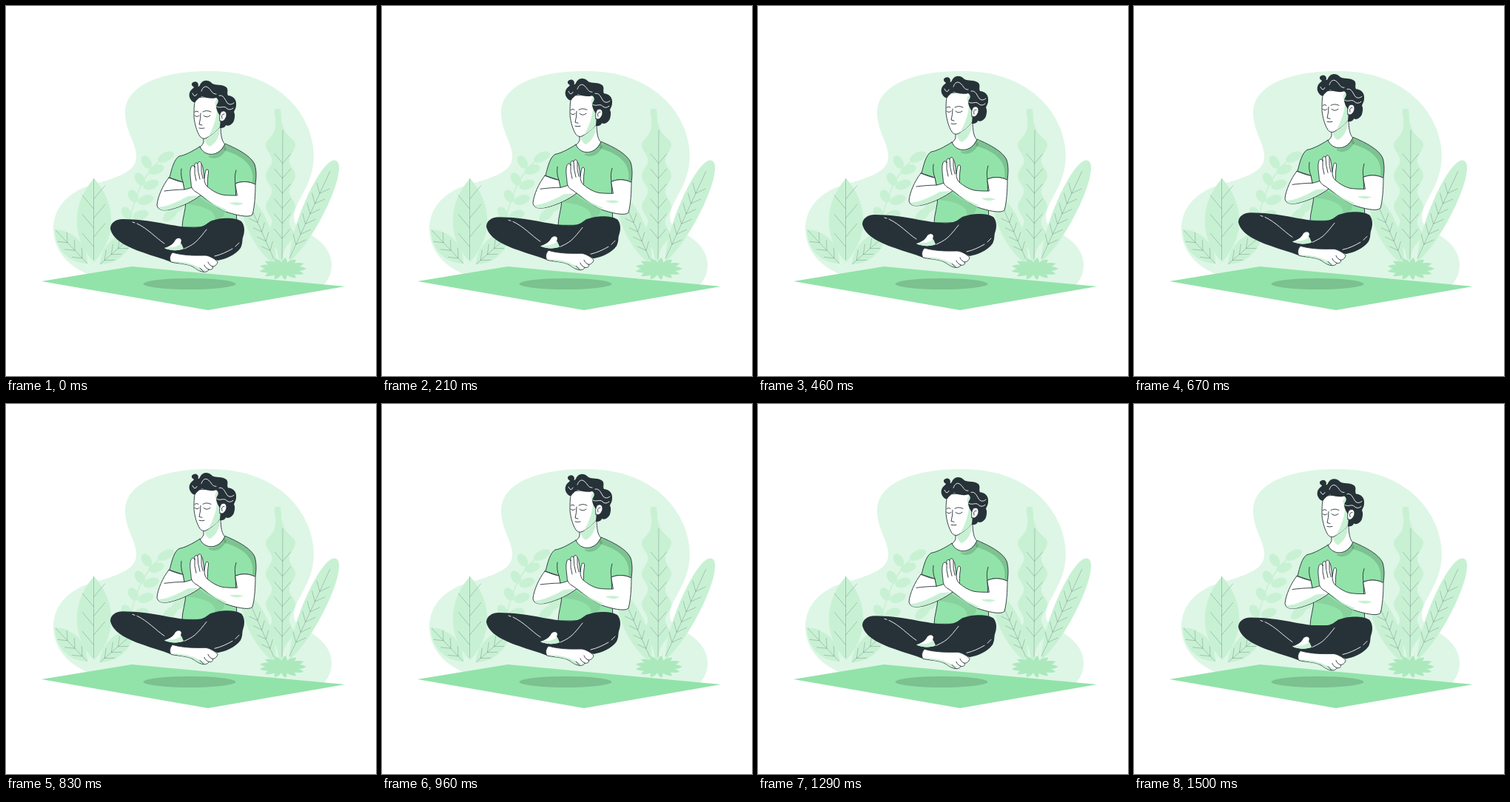
An HTML page for the animation above (1.54 s loop, 500 by 500 pixels).

```html
<!DOCTYPE html>
<html lang="en">
<head>
<meta charset="utf-8">
<title>Floating meditation</title>
<style>
html, body { margin: 0; width: 100%; height: 100%; overflow: hidden; background: #fff; }
svg { display: block; width: 100vw; height: 100vh; }
.leaf { fill: #c8f1d4; }
.vein { fill: none; stroke: #263238; stroke-opacity: .27; stroke-width: .9; }
.skin, .shirt, .line { stroke: #263238; stroke-width: .9; stroke-linecap: round; stroke-linejoin: round; }
.skin, .white { fill: #fff; }
.shirt { fill: #92e3a9; }
.line, .shine { fill: none; }
.shine { stroke: #fff; stroke-width: .9; stroke-linecap: round; }
.tint { fill: #c8f1d4; }
.dark { fill: #263238; }
.shade { opacity: .14; }
.soft { opacity: .07; }
</style>
</head>
<body>
<svg viewBox="0 0 500 500">
  <path fill="#def6e6" d="M120 366C84 354 63 330 64 298C66 266 92 248 118 241C150 232 176 224 176 204C177 186 160 168 161 142C163 105 215 87 278 88C364 88 415 143 416 203C415 245 390 262 389 285C389 300 405 305 415 311C432 322 441 337 440 352C439 365 434 373 428 378L170 356Z"/>
  <path id="leaves" class="leaf"/>
  <g id="sprig" class="leaf"></g>
  <path id="veins" class="vein"/>
  <path id="tuft" fill="#abe9bc"/>

  <path fill="#92e3a9" d="M48 372L170 352L458 379L273 411Z"/>
  <ellipse fill="#7cc190" cx="248" cy="375.5" rx="62.5" ry="7.5"/>

  <g id="man">
    <!-- torso -->
    <path class="skin" d="M267 174V184C266 187 264 189 262 191C267 205 286 206 296 187C292 183 290 176 290 161Z"/>
    <path class="tint" d="M268 179C275 178 282 173 289 165C289 175 284 186 275 190Q270 187 268 179Z"/>
    <path class="shirt" d="M262 190C251 197 241 202 234 203C227 207 224 220 221 232L239 238C240 246 243 255 243 263C243 276 238 288 238 299H312L310 240C319 236 329 237 337 241C338 233 339 224 336 214C331 203 315 194 296 186C289 204 268 205 262 190Z"/>
    <path class="shade" d="M296 187C315 194 331 203 336 214C339 224 338 233 337 240L333 238C336 221 327 204 294 195Z"/>
    <path class="shade" d="M274 204C284 209 293 203 298 193L295 188C290 198 282 203 274 202Z"/>
    <path class="soft" d="M258 256C268 263 280 271 294 276C298 283 291 288 282 290C286 277 266 270 245 268Z"/>
    <path class="line" d="M237 220C236 226 237 233 239 238M311 222C309 228 309 234 310 240"/>

    <!-- legs -->
    <path class="dark" d="M158 288C147 288 141 294 141 301C144 315 161 325 185 333C198 338 211 341 223 346L226 334C240 338 262 336 274 339L286 344C296 342 310 337 317 327C320 321 319 317 320 313C323 305 323 297 318 291C309 285 288 286 276 291C270 295 268 298 258 299C233 301 200 288 158 288Z"/>
    <path class="shine" d="M171 292L174 293M177 294C192 301 202 313 214 321M271 302C266 308 262 314 255 320C250 324 245 326 241 328M282 338C291 336 299 332 306 328M310 325L315 320"/>
    <path class="white" d="M214 327C221 325 227 321 229 316C232 313 236 313 237 317C235 322 237 325 240 328C234 331 221 331 214 327Z"/>
    <path class="tint" d="M214 327C223 325 228 328 237 321L240 328C234 331 221 331 214 327Z"/>
    <path class="skin" d="M225 333C242 338 260 337 270 337C276 338 283 342 286 346C285 350 282 352 279 352C281 355 277 357 274 356C273 359 269 360 265 359C260 358 257 355 252 352C244 348 231 348 223 346C220 341 222 336 225 333Z"/>
    <path class="tint" d="M224 345C235 345 248 347 256 351Q262 354 270 357C267 360 260 358 253 352C244 348 232 348 224 345Z"/>
    <path class="line" d="M279 352Q274 350 273 346M274 356Q269 354 268 350M267 359L262 354"/>

    <!-- arms and hands -->
    <path class="skin" d="M220 232C212 242 205 258 204 269C205 276 212 277 222 275C238 271 252 264 264 255L256 243C252 245 246 247 241 248L239 238C232 237 226 234 220 232Z"/>
    <path class="tint" d="M206 272C219 271 233 264 246 257L260 256C248 266 233 272 221 275C213 277 207 276 206 272Z"/>
    <path class="line" d="M214 250C222 249 232 248 241 248"/>
    <path class="skin" d="M310 240C319 236 329 237 337 241C337 255 336 271 333 282C328 287 309 282 297 278C282 271 268 259 258 252C252 249 250 245 250 239C249 231 248 223 250 218C251 215 254 215 255 218C254 212 257 211 259 213C260 209 264 210 264 214C266 215 266 219 267 225L268 233C269 228 269 223 271 221C274 220 274 224 273 229C272 235 273 240 272 244C278 249 284 253 292 255C299 256 305 256 312 256Z"/>
    <path class="tint" d="M302 266C309 265 316 265 321 267C315 270 308 270 302 266ZM267 258C277 266 288 271 298 275L297 278C284 272 275 265 267 258Z"/>
    <path class="line" d="M255 217Q254 226 257 236M259 213Q259 224 262 234M264 214Q263 224 266 233M268 233Q268 241 272 244"/>

    <!-- head -->
    <path class="skin" d="M257 124C254 129 254 139 254 150C255 160 258 170 262 176C265 180 269 180 273 177C280 173 286 168 289 163L296 154L288 122Z"/>
    <path class="tint" d="M286 126C281 128 282 134 285 139C285 151 280 165 273 177C280 173 286 168 289 163L294 151Z"/>
    <path class="dark" d="M250 127C246 122 247 115 253 111C256 109 250 109 251 105C253 101 260 101 260 107C259 109 260 110 262 107C265 99 274 99 279 105C284 108 292 105 298 110C301 114 298 117 300 121C306 121 312 126 311 134C311 138 309 140 308 143C310 147 309 151 308 155C306 160 301 163 297 161C296 165 291 165 289 165L290 150L287 145C285 141 283 137 285 133C288 129 287 126 284 124C277 126 270 124 265 122C262 123 260 125 257 128C256 131 253 131 250 127Z"/>
    <path class="skin" d="M289 155C288 149 289 143 293 142C298 141 299 147 297 151C295 155 292 157 289 155Z"/>
    <path class="line" d="M295 146Q290 146 292 152M255 143Q258 141 260 143M266 143Q271 140 277 143M255 148Q258 151 261 148M267 148Q271 152 276 148M263 145Q263 153 261 160L265 161M261 165Q264 166 268 165"/>
    <path class="shine" d="M252 118Q255 125 258 119M264 115C266 109 270 107 274 111C278 114 278 119 284 119M288 121C294 120 295 125 299 131Q303 135 308 131M285 136C290 139 294 134 298 138Q302 142 307 138"/>
  </g>
</svg>
<script>
const LOOP = 1540, RISE = 10, LEAD = 60;
const $ = id => document.getElementById(id);
const range = n => [...Array(n).keys()];
const setPath = (id, d) => $(id).setAttribute('d', d);
const along = (x, y, angle, len) => [x + len * Math.cos(angle), y + len * Math.sin(angle)];

// Symmetric blade from base to tip; bulge moves the wide part toward the tip
function blade(x, y, tx, ty, width, bulge = .7) {
  const dx = tx - x, dy = ty - y, len = Math.hypot(dx, dy);
  const at = (k, side) => [x + dx * k - dy / len * side * width, y + dy * k + dx / len * side * width];
  return `M${x} ${y}C${at(.28, 1)} ${at(bulge, 1)} ${tx} ${ty}C${at(bulge, -1)} ${at(.28, -1)} ${x} ${y}Z`;
}

// Midrib with side veins; skew sets one side further along than the other
function rib(x, y, tx, ty, count, len, skew = 0) {
  const dir = Math.atan2(ty - y, tx - x);
  let d = `M${x} ${y}L${tx} ${ty}`;
  for (const i of range(count)) for (const side of [-1, 1]) {
    const k = .16 + .7 * i / count + (side > 0 ? skew : 0);
    const px = x + (tx - x) * k, py = y + (ty - y) * k;
    d += `M${px} ${py}L${along(px, py, dir + side * .7, len)}`;
  }
  return d;
}

// Tall leaf whose width swells in waves and narrows at both ends
function wavyLeaf(cx, top, bottom) {
  const edge = side => range(70).map(i => {
    const k = i / 69, y = top + (bottom - top) * k;
    const wave = 15.8 + 4.2 * Math.cos((y - 188) / 41.5 * 2 * Math.PI);
    const taper = Math.min(1, .22 + Math.max(0, k - .08) * 6, (1 - k) * 5);
    const lean = Math.max(0, .2 - k) * 22;
    return [cx - lean + side * wave * taper, y];
  });
  return `M${[...edge(-1), ...edge(1).reverse()].join('L')}Z`;
}

setPath('leaves',
  blade(119, 346, 119, 233, 31) +
  blade(110, 348, 66, 302, 18) +
  blade(127, 349, 174, 304, 17) +
  blade(383, 346, 446, 209, 20, 1) +
  blade(364, 350, 321, 254, 19, .85) +
  wavyLeaf(371, 139, 348));

setPath('veins',
  rib(118.5, 343, 118.5, 233, 3, 24, .12) +
  rib(110, 348, 67, 303, 3, 14) +
  rib(127, 349, 166, 315, 3, 14) +
  rib(373, 342, 374, 168, 6, 17) +
  rib(383, 341, 438, 223, 6, 15) +
  rib(362, 342, 330, 270, 4, 13));

const oval = (x, y, rx, tilt) =>
  `<ellipse rx="${rx}" ry="6.300" transform="translate(${x} ${y}) rotate(${tilt})"/>`;
$('sprig').innerHTML =
  '<path d="M162 330Q170 232 216 203" fill="none" stroke="#c8f1d4" stroke-width="1.6"/>' +
  oval(216, 204, 12, -27) +
  range(4).map(i => oval(190 - 9 * i, 211 + 23 * i, 9.5, 58) +
    oval(203 - 7 * i, 221 + 20.5 * i, 11, -18)).join('') +
  range(2).map(i => oval(222 + 12 * i, 282 - 12 * i, 12, -42)).join('');

setPath('tuft', range(13).map(i => {
  const a = i / 13 * 2 * Math.PI;
  return blade(374, 355, 374 + 32 * Math.cos(a), 355 + 15 * Math.sin(a), 5);
}).join(''));

const liftAt = ms => RISE * (1 - Math.abs(1 - 2 * ((ms + LEAD) % LOOP) / LOOP));

function draw(ms) {
  $('man').setAttribute('transform', `translate(0 ${(liftAt(0) - liftAt(ms)).toFixed(3)})`);
}

let start;
function tick(now) {
  start ??= now;
  draw(now - start);
  requestAnimationFrame(tick);
}
draw(0);
requestAnimationFrame(tick);
</script>
</body>
</html>
```
